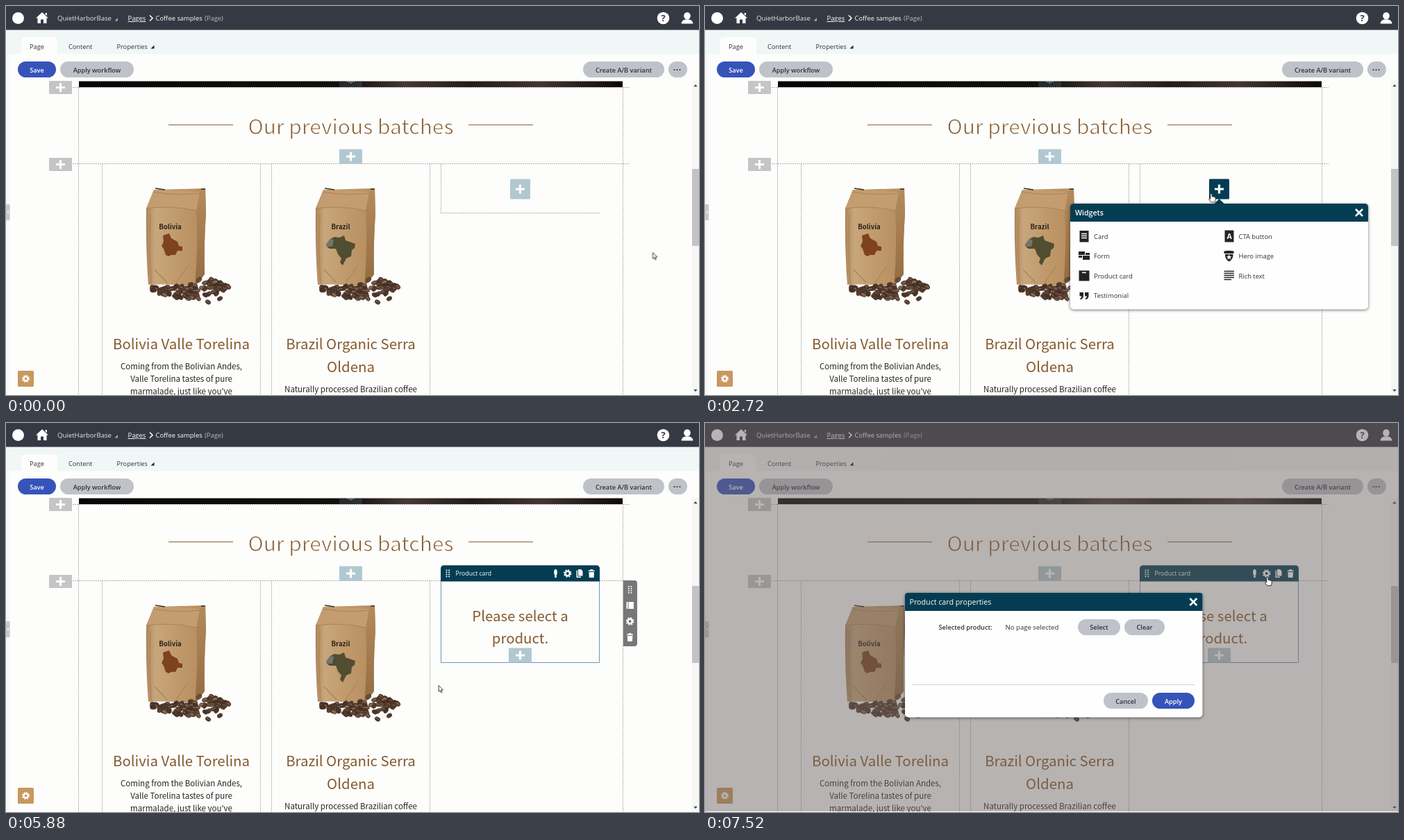
Write an HTML page that moves like this. It is 998 px wide and 561 px high and loops after 8 s.

```html
<!DOCTYPE html>
<html lang="en">
<head>
<meta charset="utf-8">
<title>Page builder</title>
<style>
html, body { margin: 0; width: 100%; height: 100%; overflow: hidden; background: #fdfdfc; }
svg { display: block; width: 998px; height: 561px; }
text { font-family: "Open Sans", "Noto Sans", sans-serif; font-size: 9.4px; fill: #2f3237; white-space: pre; }
.mid { text-anchor: middle; }
.semi { font-weight: 600; font-size: 9.2px; }
.white { fill: #fff; }
.top { fill: #e6e7ea; }
.h1, .h2, .body, .label { font-family: "Noto Sans CJK JP", "Noto Sans CJK SC", "Noto Sans CJK", "Open Sans", sans-serif; text-anchor: middle; }
/* The page-coloured outline thins the strokes to a light weight */
.h1 { font-size: 30px; font-weight: 300; fill: #84592a; stroke: #fdfdfc; stroke-width: .9px; }
.h2 { font-size: 20.4px; fill: #855a2b; }
.body { font-size: 11.5px; fill: #262422; }
.label { font-size: 9.6px; font-weight: 700; fill: #2b2119; }
.dots { fill: none; stroke: #b2b2b2; stroke-dasharray: 2 1; shape-rendering: crispEdges; }
.grey { fill: #bfc2c9; }
.blue { fill: #3653ba; }
.teal { fill: #043d52; }
.pale { fill: #b1c8d1; }
.shade { fill: #68605f; fill-opacity: .47; }
.float { filter: drop-shadow(0 1px 2px rgba(0,0,0,.55)); }

.anim, .cursor { animation: 8s step-end infinite; }
.darkplus { animation-name: darkplus; }
.cell { animation-name: cell; }
.popup { animation-name: popup; }
.hover { animation-name: hover; }
.card { animation-name: card; }
.tools { animation-name: tools; }
.blank { animation-name: blank; }
.dialog { animation-name: dialog; }
.arrow { animation-name: arrow; }
.hand { animation-name: hand; }
.cursor { animation-name: travel; animation-timing-function: cubic-bezier(.35,.1,.5,.95); }
@keyframes darkplus { 0% { opacity: 0 } 7.5% { opacity: 1 } 50.5%, 100% { opacity: 0 } }
@keyframes cell { 0% { opacity: 1 } 52.5%, 100% { opacity: 0 } }
@keyframes popup { 0% { opacity: 0 } 14.5% { opacity: 1 } 50.5%, 100% { opacity: 0 } }
@keyframes card { 0% { opacity: 0 } 52.5%, 100% { opacity: 1 } }
@keyframes tools { 0% { opacity: 0 } 52.5% { opacity: 1 } 93.45%, 100% { opacity: 0 } }
@keyframes blank { 0% { opacity: 0 } 93.45% { opacity: 1 } 93.95%, 100% { opacity: 0 } }
@keyframes dialog { 0% { opacity: 0 } 93.95%, 100% { opacity: 1 } }
@keyframes hover {
  0% { opacity: 0; transform: translateY(0) }
  38.25% { opacity: 1; transform: translateY(0) }
  40.25% { opacity: 1; transform: translateY(28.5px) }
  43.95% { opacity: 1; transform: translateY(57px) }
  50.5%, 100% { opacity: 0; transform: translateY(57px) }
}
@keyframes arrow {
  0% { opacity: 1 } 7.5% { opacity: 0 } 35% { opacity: 1 } 38.25% { opacity: 0 }
  67.5% { opacity: 1 } 85.5%, 100% { opacity: 0 }
}
@keyframes hand {
  0% { opacity: 0 } 7.5% { opacity: 1 } 35% { opacity: 0 } 38.25% { opacity: 1 }
  67.5% { opacity: 0 } 85.5%, 100% { opacity: 1 }
}
@keyframes travel {
  0%, 2% { transform: translate(931.5px, 355.5px) }
  8%, 33% { transform: translate(734.5px, 265px) }
  43.5% { transform: translate(621px, 373px) }
  44.5%, 67.4% { transform: translate(618.5px, 381px) }
  67.5%, 73% { transform: translate(619.5px, 381px) }
  83.5% { transform: translate(805px, 247px) }
  87.5%, 100% { transform: translate(810px, 222px) }
}
</style>
</head>
<body>
<svg viewBox="0 0 998 561">
<defs>
  <path id="plus" d="M-6.5 0H6.5M0-6.5V6.5" stroke="#fff" stroke-width="3.2"/>
  <path id="close" d="M-5-5L5 5M5-5L-5 5" stroke="#fff" stroke-width="2.6"/>
  <g id="gear" fill="none" stroke="#fff">
    <circle r="3.2" stroke-width="2.5"/>
    <circle r="4.9" stroke-width="1.9" stroke-dasharray="1.924"/>
  </g>
  <path id="grip" d="M-1.8-5V6M1.8-5V6" stroke="#fff" stroke-width="1.8" stroke-dasharray="1.8 1.2"/>
  <path id="trash" d="M-4.5-4.5H-1.8V-6H1.8V-4.5H4.5V-3H-4.5ZM-3.8-2H3.8L3.4 6H-3.4Z" fill="#fff"/>
  <g id="addgrey"><rect x="-16.5" y="-9.5" width="33" height="19" rx="1" fill="#c3c5c6"/><use href="#plus"/></g>
  <g id="addpale"><rect class="pale" x="-16.5" y="-10.5" width="33" height="21" rx="1"/><use href="#plus"/></g>
  <linearGradient id="paper">
    <stop offset="0" stop-color="#ad8559"/><stop offset=".15" stop-color="#c8a67c"/>
    <stop offset=".5" stop-color="#c09a6c"/><stop offset="1" stop-color="#b58c5c"/>
  </linearGradient>
  <linearGradient id="side" x2="0" y2="1">
    <stop offset="0" stop-color="#b48b5c"/><stop offset="1" stop-color="#936b41"/>
  </linearGradient>
  <linearGradient id="hero">
    <stop offset="0" stop-color="#070504"/><stop offset=".5" stop-color="#14100e"/>
    <stop offset=".6" stop-color="#463832"/><stop offset=".72" stop-color="#241b17"/>
    <stop offset=".85" stop-color="#43352f"/><stop offset="1" stop-color="#0c0807"/>
  </linearGradient>
  <g id="bag">
    <path d="M213 265L287 263L288 300Q285 340 286 387L272 405Q238 400 205 402Q201 350 202 292Z" fill="url(#paper)"/>
    <path d="M279 268L287 263L288 300Q285 340 286 387L272 405Q277 345 274 295Z" fill="url(#side)"/>
    <path d="M213 265L279 268L274 295Q238 289 202 292Z" fill="#c39d70"/>
    <path d="M202 292Q238 287 274 295M212 268Q245 274 279 270" fill="none" stroke="#a37b4e" stroke-width=".8"/>
    <path d="M208 300Q206 350 209 400M214 380L232 399M262 375L245 399" fill="none" stroke="#ab8459" stroke-width="1.2"/>
    <path d="M215 263L229 265M281 264H287" stroke="#3b2c20" stroke-width="1.5"/>
    <g id="beans"></g>
  </g>
  <g id="footer">
    <path d="M299 377.5H705" stroke="#d2d3d3"/>
    <rect class="grey" x="574" y="389" width="64" height="23" rx="11.5"/>
    <rect class="blue" x="644" y="389" width="61" height="23" rx="11.5"/>
    <text class="semi mid" x="606" y="404.5">Cancel</text>
    <text class="semi mid white" x="674.5" y="404.5">Apply</text>
  </g>
</defs>

<rect width="998" height="561" fill="#fdfdfc"/>
<rect y="69" width="5" height="492" fill="#f7f9f9"/>
<rect y="34" width="998" height="35" fill="#f1f6f6"/>
<path d="M22 69V50Q22 45 27 45H69Q74 45 74 50V69Z" fill="#fdfdfc"/>
<rect width="998" height="34.5" fill="#353943"/>

<!-- top bar -->
<circle cx="17.5" cy="17.5" r="8.5" fill="#fff"/>
<path d="M52 9L61 17.5H58.5V25H54V19.5H50V25H45.5V17.5H43Z" fill="#fff"/><path d="M56.5 10H59V14L56.5 12Z" fill="#fff"/>
<text class="top" x="74" y="21" style="font-size:9.6px">QuietHarborBase</text>
<path d="M156.5 21.5H161V17Z" fill="#a9abb0"/>
<text class="white" x="175.5" y="21" text-decoration="underline">Pages</text>
<path d="M207 13.5L211 17.5L207 21.5" fill="none" stroke="#fff" stroke-width="1.6"/>
<text class="white" x="215.5" y="21">Coffee samples</text>
<text x="286" y="21" style="fill:#b9bbc0">(Page)</text>
<circle cx="946.5" cy="17.5" r="8.8" fill="#fff"/>
<text class="mid" x="946.5" y="22.3" style="font-size:13px;font-weight:700;fill:#353943">?</text>
<ellipse cx="981" cy="14.3" rx="4.8" ry="5.3" fill="#fff"/>
<path d="M972.5 25.5Q973 20.5 978 19.5H984Q989 20.5 989.5 25.5Z" fill="#fff"/>

<!-- tabs and toolbar -->
<text x="34" y="61.5" style="font-size:9.2px">Page</text>
<text x="90" y="61.5" style="font-size:9.2px">Content</text>
<text x="159.5" y="61.5" style="font-size:9.2px">Properties</text>
<path d="M208.5 61.5H213.5V56.5Z" fill="#222"/>
<rect class="blue" x="17" y="80" width="55" height="23" rx="11.5"/>
<rect class="grey" x="78" y="80" width="106" height="23" rx="11.5"/>
<rect class="grey" x="831" y="80" width="117" height="23" rx="11.5"/>
<rect class="grey" x="954" y="80" width="27" height="23" rx="11.5"/>
<text class="semi mid white" x="44.5" y="95.5">Save</text>
<text class="semi mid" x="131" y="95.5">Apply workflow</text>
<text class="semi mid" x="889.5" y="95.5">Create A/B variant</text>
<path d="M962.5 92H971.5" stroke="#33363d" stroke-width="2.2" stroke-linecap="round" stroke-dasharray="0 4"/>

<!-- page -->
<rect x="105" y="108.5" width="783" height="8.5" fill="url(#hero)"/>
<path d="M480 108.5H513V117H480Z" fill="#4f6068" opacity=".35"/>
<path d="M491 109H502M496.5 109V112" stroke="#93a5ad" stroke-width="2" opacity=".6"/>
<path class="dots" d="M104.5 117V560M888.5 117V560M96 117.5H898M96 227.5H898M138.5 228V560M366.5 228V560M382.5 228V560M610.5 228V560"/>
<use href="#addgrey" x="78.5" y="117.5"/>
<use href="#addgrey" x="78.5" y="228.5"/>
<use href="#addpale" x="496.5" y="217"/>
<path d="M234 171.5H327M666 171.5H759" stroke="#8a6232"/>
<text class="h1" x="496.5" y="184.5">Our previous batches</text>

<use href="#bag"/>
<path d="M226 331L235 328L238 335L247 340L249 346L254 347V353L247 353L244 359L238 359L234 361L230 359L227 350L224 346L227 340Z" fill="#7d421f"/>
<text class="label" x="236.5" y="321.5">Bolivia</text>
<use href="#bag" x="244"/>
<path d="M461 344L467 336L473 333L480 334L487 331L489 338L503 343L502 349L498 352L497 361L490 364L485 374L481 370L483 364L478 358L475 350L466 350L462 347Z" fill="#514d31"/>
<path d="M461 344L467 336L472 337L470 347L462 347Z" fill="#74766c"/>
<text class="label" x="482" y="321.5">Brazil</text>

<text class="h2" x="252.5" y="495">Bolivia Valle Torelina</text>
<text class="body" x="252.5" y="524">Coming from the Bolivian Andes,</text>
<text class="body" x="252.5" y="542">Valle Torelina tastes of pure</text>
<text class="body" x="252.5" y="560">marmalade, just like you've</text>
<text class="h2" x="496.5" y="495">Brazil Organic Serra</text>
<text class="h2" x="496.5" y="527.5">Oldena</text>
<text class="body" x="496.5" y="556.5">Naturally processed Brazilian coffee</text>

<rect x="17" y="526" width="23" height="23" rx="1.5" fill="#c8985f"/>
<use href="#gear" transform="translate(28.5 537.5) scale(.95)"/>
<rect y="286" width="5.5" height="23" fill="#c6c8c8"/>
<path d="M3.6 295L1.6 297.5L3.6 300Z" fill="#fff"/>
<rect x="988" y="108" width="10" height="452" fill="#f6f6f5"/>
<rect x="988" y="235" width="10" height="111" fill="#c3c3c3"/>
<path d="M990.3 116.2H995.7L993 113ZM990.3 553H995.7L993 556.2Z" fill="#444"/>

<!-- third column -->
<g class="anim cell">
  <path class="dots" d="M626.5 228V298.5H854.5"/>
  <rect class="pale" x="726" y="249.5" width="29" height="29" rx="1.5"/>
  <use href="#plus" x="740.5" y="264"/>
</g>
<g class="anim darkplus">
  <rect class="teal" x="726" y="249.5" width="29" height="29" rx="1.5"/>
  <use href="#plus" x="740.5" y="264"/>
</g>
<g class="anim card">
  <path d="M626.5 228V345.5H854.5V228" fill="none" stroke="#6698bb"/>
  <path class="teal" d="M626 228.5V210Q626 205.3 631 205.3H850Q855 205.3 855 210V228.5Z"/>
  <use href="#grip" x="636.3" y="216.5"/>
  <text class="white" x="647.5" y="220" style="font-size:8.7px">Product card</text>
  <path d="M789.3 213Q791.5 208.5 793.7 213V218L792.8 219V223H790.2V219L789.3 218Z" fill="#fff"/>
  <use href="#gear" x="808.7" y="217"/>
  <path d="M821.5 212.5H823V221.5H828V223H821.5ZM824 211H828L830.5 213.5V220.5H824Z" fill="#fff"/>
  <use href="#trash" x="843.2" y="217"/>
  <text class="h2" x="740.5" y="286">Please select a</text>
  <text class="h2" x="740.5" y="318">product.</text>
  <use href="#addpale" x="740.5" y="335"/>
</g>
<g class="anim tools">
  <path d="M889 227H905Q909 227 909 231V318Q909 322 905 322H889Z" fill="#757779"/>
  <use href="#grip" x="898.6" y="240"/>
  <path d="M893.5 258H895.5V268H893.5ZM896.5 258H904V268H896.5Z" fill="#fff"/>
  <use href="#gear" x="898.6" y="286"/>
  <use href="#trash" x="898.6" y="309"/>
</g>

<!-- widget list -->
<g class="anim popup">
  <path class="teal" d="M732.5 286L740.5 278L748.5 286Z"/>
  <rect class="float" x="526" y="285" width="429" height="152.5" rx="5" fill="#fefefe"/>
  <path class="teal" d="M526 311V290Q526 285 531 285H950Q955 285 955 290V311Z"/>
  <text class="white" x="533" y="302.3" style="font-size:10.6px;font-weight:600">Widgets</text>
  <use href="#close" x="942" y="298"/>
  <rect class="anim hover" x="532" y="317.5" width="209" height="28.5" fill="#eff1fc"/>
  <g fill="#222527">
    <path d="M539.5 324H552.5V340.5H539.5Z"/>
    <path d="M538 354H547V359H538ZM548 356H554V359H548ZM538 360H543V363H538ZM544 360H554V366H544Z"/>
    <path d="M538.5 381.5H553.5V396.5H538.5Z"/>
    <path id="quote" d="M539.5 413H545V418.5Q544.5 422.5 540.5 423.5V421.5Q542.5 420.5 542.5 418.5H539.5Z"/>
    <use href="#quote" x="7.5"/>
    <path d="M748.5 323.5H761.5V340.5H748.5Z"/>
    <path d="M747.5 353.5Q754.5 352 761.5 353.5V357H747.5ZM749 358H760.5Q761 365.5 754.7 368.5Q748.5 365.5 749 358Z"/>
  </g>
  <path d="M542 328.5H550M542 331.5H550M542 334.5H550M543 384.5H549" stroke="#fff" stroke-width="1.3"/>
  <path d="M754.7 358.2L755.8 361H758.6L756.4 362.7L757.2 365.5L754.7 363.9L752.2 365.5L753 362.7L750.8 361H753.6Z" fill="#fff"/>
  <text class="mid white" x="755" y="335.8" style="font-size:10.5px;font-weight:700">A</text>
  <path d="M747.5 382.5H762M747.5 385.5H762M747.5 388.5H762M747.5 391.5H762M747.5 394.5H758" stroke="#222527" stroke-width="1.4"/>
  <g id="items"></g>
</g>

<!-- dialogs -->
<g class="anim blank">
  <rect class="shade" x="5.5" y="108" width="992.5" height="452"/>
  <rect class="float" x="288" y="217" width="428.5" height="235.5" rx="5" fill="#fefefe"/>
  <use href="#footer" y="29"/>
</g>
<g class="anim dialog">
  <rect class="shade" width="998" height="560"/>
  <rect class="float" x="288" y="245" width="428.5" height="179.5" rx="5" fill="#fefefe"/>
  <path class="teal" d="M288 271V249Q288 245 292 245H712.5Q716.5 245 716.5 249V271Z"/>
  <text class="white" x="294.5" y="262" style="font-size:10.7px">Product card properties</text>
  <use href="#close" x="703.3" y="258"/>
  <text class="semi" x="336.5" y="298">Selected product:</text>
  <text x="432.5" y="298" style="font-size:9.6px">No page selected</text>
  <rect class="grey" x="537" y="283" width="61" height="23" rx="11.5"/>
  <rect class="grey" x="604" y="283" width="58" height="23" rx="11.5"/>
  <text class="semi mid" x="567.5" y="298">Select</text>
  <text class="semi mid" x="633" y="298">Clear</text>
  <use href="#footer"/>
</g>

<g class="cursor" stroke="#222" stroke-width=".9" stroke-linejoin="round" fill="#fff">
  <path class="anim arrow" d="M0 0V9L2.1 7.2L3.5 10.4L4.9 9.8L3.5 6.7L6.3 6.4Z"/>
  <path class="anim hand" d="M-1.2 .8Q0-.6 1.2 .8V4.6Q3 4 3.4 5Q5 4.8 5.2 5.6Q6.5 5.6 6.4 7L6 10L5.2 12.6H-.4L-3.4 8.4Q-3.3 6.8-1.2 8Z"/>
</g>
</svg>
<script>
const make = (parent, tag, attrs, text) => {
  const el = document.createElementNS("http://www.w3.org/2000/svg", tag);
  for (const key in attrs) el.setAttribute(key, attrs[key]);
  if (text) el.textContent = text;
  parent.append(el);
};

const items = document.getElementById("items");
["Card", "Form", "Product card", "Testimonial", "CTA button", "Hero image", "Rich text"].forEach((name, i) =>
  make(items, "text", { x: i < 4 ? 560 : 768.5, y: 335.7 + (i % 4) * 28.5 }, name));

// Heap of coffee beans
let seed = 11;
const rand = () => (seed = (seed * 16807) % 2147483647) / 2147483647;
const heap = [[291, 427], [308, 422], [320, 405]];
for (let i = 0; i < 130; i++) {
  const x = 211 + 109 * rand();
  const top = x < 268 ? 406 - (x - 209) * .08 : x < 286 ? 401 - (x - 268) * .65 : 390 + (x - 286) * .38;
  const low = x < 240 ? 410 + (x - 209) * .36 : x < 292 ? 422 : 422 - (x - 292) * .6;
  heap.push([x, top + (low - top) * rand()]);
}
const browns = ["#4f382b", "#654837", "#785a46", "#583f31"];
const beans = document.getElementById("beans");
heap.sort((a, b) => a[1] - b[1]).forEach(([x, y], i) => {
  const transform = `translate(${x.toFixed(1)} ${y.toFixed(1)}) rotate(${Math.round(rand() * 100 - 50)})`;
  make(beans, "ellipse", { transform, rx: 4, ry: 2.8, fill: browns[i % 4], stroke: "#35241a", "stroke-width": .5 });
  make(beans, "path", { transform, d: "M-3 0Q0 -1.2 3 .2", fill: "none", stroke: i % 3 ? "#38271d" : "#a98a74", "stroke-width": .7 });
});
</script>
</body>
</html>
```
